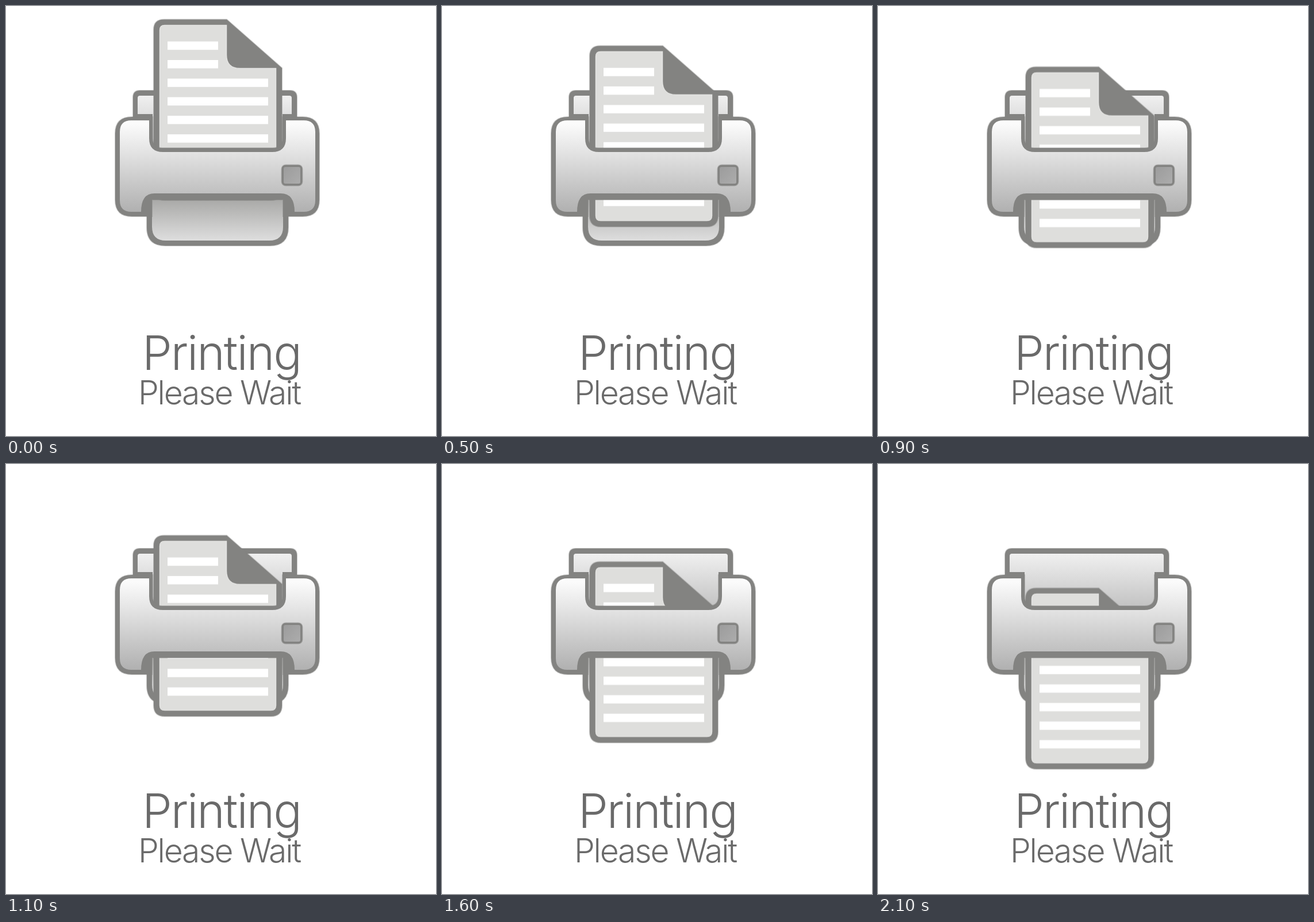
An HTML page that plays this animation: 748 px wide and 748 px high, repeating every 2.2 s.

```html
<!DOCTYPE html>
<html lang="en">
<head>
<meta charset="utf-8">
<title>Printing</title>
<style>
  html, body { margin: 0; width: 100%; height: 100%; overflow: hidden; background: #fff; }
  svg { display: block; width: 100vw; height: 100vh; }
  text { font-family: Inter, Roboto, "Liberation Sans", sans-serif; font-weight: 300; fill: #6a6a6a; }
  .dark { fill: #838381; stroke: #838381; stroke-width: 2; stroke-opacity: .45; }
  .paper { fill: #dededc; stroke: #e3e3e1; stroke-width: 1.5; }
  .line { fill: #fff; }
</style>
</head>
<body>
<svg viewBox="0 0 748 748">
  <defs>
    <linearGradient id="back" x2="0" y2="1">
      <stop offset="0" stop-color="#f0f0f0"/><stop offset="1" stop-color="#c2c2c2"/>
    </linearGradient>
    <linearGradient id="body" x2="0" y2="1">
      <stop offset="0" stop-color="#fefefe"/><stop offset="1" stop-color="#b0b0b0"/>
    </linearGradient>
    <linearGradient id="tray" x2="0" y2="1">
      <stop offset="0" stop-color="#a4a4a2"/><stop offset="1" stop-color="#dedede"/>
    </linearGradient>
    <linearGradient id="button" x2="1" y2="1">
      <stop offset="0" stop-color="#9c9c9c"/><stop offset="1" stop-color="#acacac"/>
    </linearGradient>
    <clipPath id="above"><path d="M0 0H748V252H0z"/></clipPath>
    <clipPath id="below"><path d="M0 330H748V748H0z"/></clipPath>
  </defs>

  <!-- feeder behind the sheet -->
  <path class="dark" d="M221 200V159Q221 147 233 147H494Q506 147 506 159V200z"/>
  <path fill="url(#back)" d="M229 188V160Q229 156 233 156H493Q497 156 497 160V188H481V250H255V188z"/>

  <!-- sheet going in -->
  <g clip-path="url(#above)"><g class="sheet" id="top">
    <path class="dark" d="M257 300V41Q257 23.5 275 23.5H384L480 108V300z"/>
    <path class="paper" d="M267.5 300V42Q267.5 33.5 276 33.5H383.5V85Q383.5 108.5 407 108.5H469.5V300z"/>
  </g></g>

  <!-- output tray -->
  <path class="dark" d="M245 330H491V385Q491 417 459 417H277Q245 417 245 385z"/>
  <path fill="url(#tray)" d="M254 330H482V384Q482 408 458 408H278Q254 408 254 384z"/>

  <!-- sheet coming out -->
  <g clip-path="url(#below)"><g class="sheet" id="bottom">
    <path class="dark" d="M257 60H480V319Q480 338 461 338H276Q257 338 257 319z"/>
    <path class="paper" d="M267.5 60H469.5V319Q469.5 327.5 461 327.5H276Q267.5 327.5 267.5 319z"/>
  </g></g>

  <!-- body -->
  <path class="dark" d="M190 222Q190 193 219 193H255V230Q255 247 272 247H464Q481 247 481 230V193H516Q545 193 545 222V337Q545 366 516 366H482V337H254V366H219Q190 366 190 337z"/>
  <path fill="url(#body)" d="M198 219Q198 199 218 199H249V230Q249 254 273 254H463Q487 254 487 230V199H518Q538 199 538 219V338Q538 358 518 358H502Q502 326 478 326H258Q235 326 235 358H218Q198 358 198 338z"/>
  <rect class="dark" x="479.5" y="276.5" width="36" height="36" rx="7"/>
  <rect fill="url(#button)" x="483" y="280" width="29" height="29" rx="3"/>

  <text x="237" y="633" font-size="82.5" letter-spacing="-2">Printing</text>
  <text x="230" y="693" font-size="57" letter-spacing="-2.2">Please Wait</text>
</svg>
<script>
  const LOOP = 2200, STEPS = 22, TRAVEL = 201.67, PITCH = 32.3;

  function addLine(id, y, width) {
    const line = document.createElementNS("http://www.w3.org/2000/svg", "rect");
    const attrs = { class: "line", x: 281, y, width, height: 14.5 };
    for (const key in attrs) line.setAttribute(key, attrs[key]);
    document.getElementById(id).append(line);
  }

  for (let i = 0; i < 6; i++) {
    addLine("top", 61.7 + i * PITCH, i < 2 ? 88 : 175);
    addLine("bottom", 287.7 - i * PITCH, 175);
  }

  for (const sheet of document.querySelectorAll(".sheet")) {
    sheet.animate(
      [{ transform: "translateY(0)" }, { transform: `translateY(${TRAVEL}px)` }],
      { duration: LOOP, iterations: Infinity, easing: `steps(${STEPS})` }
    );
  }
</script>
</body>
</html>
```
